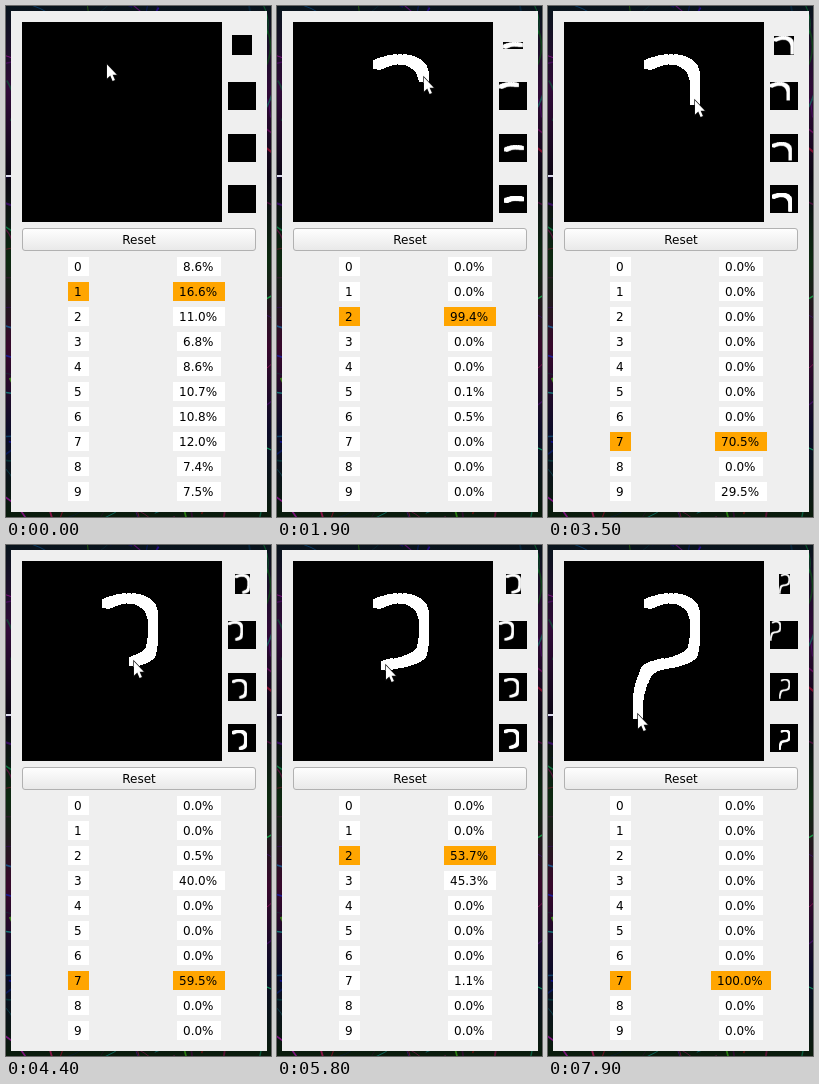
Animation, 265 px wide and 511 px high, one loop 8 s. Source, as an HTML page with a canvas:

```html
<!DOCTYPE html>
<html lang="en">
<head>
<meta charset="utf-8">
<title>Digit recognition</title>
<style>
  html, body { margin: 0; width: 100%; height: 100%; overflow: hidden; background: #000; }
  body { position: relative; font: 12px/19px "DejaVu Sans", sans-serif; color: #000; }
  canvas { position: absolute; left: 0; top: 0; }
  .cell { position: absolute; height: 19px; padding: 1px 0 0 6px; box-sizing: border-box; background: #fff; white-space: nowrap; }
  .cell.best { background: #ffa500; }
  .button {
    position: absolute; left: 16px; top: 222px; width: 234px; height: 23px; box-sizing: border-box;
    padding-top: 1px; border: 1px solid #b1b1b1; border-radius: 3px; line-height: 21px; text-align: center;
    background: linear-gradient(#fefefe, #e9e9e9);
  }
</style>
</head>
<body>
<canvas id="stage" width="265" height="511"></canvas>
<div class="button">Reset</div>
<script>
const WIDTH = 265, HEIGHT = 511, LOOP = 8000, STEP = 100, PEN_START = 300;
const ctx = document.getElementById('stage').getContext('2d');

// Strokes rest in between; each one follows a smooth curve through its points
const strokes = [
  { from: 300, to: 1000, points: [[101, 58], [117, 53], [132, 54]] },
  { from: 1100, to: 1900, points: [[143, 61], [147, 71]] },
  { from: 2300, to: 2600, points: [[147, 75]] },
  { from: 2700, to: 4400, points: [[147, 85], [144, 107], [128, 116]] },
  { from: 4700, to: 5600, points: [[112, 119]] },
  { from: 5700, to: 6500, points: [[102, 123], [97, 129]] },
  { from: 6700, to: 7200, points: [[91, 148], [90, 166]] },
  { from: 7700, to: 7900, points: [[90, 169]] }
];
const points = strokes.flatMap(stroke => stroke.points);

// Percentages by digit; digits left out are at zero
const predictions = [
  { time: 0, odds: [8.6, 16.6, 11, 6.8, 8.6, 10.7, 10.8, 12, 7.4, 7.5] },
  { time: 1200, odds: { 2: 99.4, 5: 0.1, 6: 0.5 } },
  { time: 2100, odds: { 2: 21.3, 7: 74.6, 9: 4.1 } },
  { time: 3500, odds: { 7: 70.5, 9: 29.5 } },
  { time: 4400, odds: { 2: 0.5, 3: 40, 7: 59.5 } },
  { time: 5100, odds: { 2: 53.7, 3: 45.3, 7: 1.1 } },
  { time: 6500, odds: { 2: 91.1, 3: 1.1, 7: 7.8 } },
  { time: 7400, odds: { 7: 100 } }
];

const clamp = (value, low, high) => Math.min(high, Math.max(low, value));

function makeCanvas() {
  const canvas = document.createElement('canvas');
  canvas.width = WIDTH;
  canvas.height = HEIGHT;
  return canvas;
}

// Catmull-Rom curve, one unit of u per point
function curveAt(u) {
  const i = Math.min(Math.floor(u), points.length - 2), k = u - i;
  const [a, b, c, d] = [-1, 0, 1, 2].map(n => points[clamp(i + n, 0, points.length - 1)]);
  return [0, 1].map(axis => Math.round(b[axis] + k / 2 * (c[axis] - a[axis]
    + k * (2 * a[axis] - 5 * b[axis] + 4 * c[axis] - d[axis]
    + k * (3 * (b[axis] - c[axis]) + d[axis] - a[axis])))));
}

function pointerAt(t) {
  let u = 0;
  strokes.forEach(({ from, to, points }, i) => {
    const segments = points.length - (i === 0);
    u += segments * clamp((t - from) / (to - from), 0, 1);
  });
  return curveAt(u);
}

// Every distinct place the brush has touched until t
function stampsUntil(t) {
  const stamps = [];
  if (t <= PEN_START) return stamps;
  for (let s = PEN_START; s <= t; s += 20) {
    const p = pointerAt(s), last = stamps[stamps.length - 1];
    if (!last || last[0] !== p[0] || last[1] !== p[1]) stamps.push(p);
  }
  return stamps;
}

// A block brush whose stray bristles roughen the edge
function drawInk(c, stamps) {
  c.fillStyle = '#fff';
  stamps.forEach(([x, y], i) => {
    c.fillRect(x - 5, y - 4, 10, 9);
    if (i % 5 < 2) c.fillRect(x - 1, y - 5, 3, 11);
  });
}

// The four preprocessing stages: cropped, padded, centred by mass, sharpened
function drawThumbnails(c, stamps) {
  c.fillStyle = '#000';
  for (const y of [76, 128, 179]) c.fillRect(222, y, 28, 28);
  if (!stamps.length) return c.fillRect(226, 29, 20, 20);

  const xs = stamps.map(p => p[0]), ys = stamps.map(p => p[1]);
  const mean = list => list.reduce((a, b) => a + b) / list.length;
  const left = Math.min(...xs) - 5, top = Math.min(...ys) - 5;
  const width = Math.max(...xs) + 5 - left, height = Math.max(...ys) + 6 - top;
  const scale = 20 / Math.max(width, height);
  const w = Math.round(width * scale), h = Math.round(height * scale);
  const ink = makeCanvas();
  drawInk(ink.getContext('2d'), stamps);
  c.imageSmoothingQuality = 'high';
  const place = (x, y) => c.drawImage(ink, left, top, width, height, x, y, w, h);

  const cropX = Math.round(236 - w / 2), cropY = Math.round(39 - h / 2);
  c.fillRect(cropX, cropY, w, h);
  place(cropX, cropY);
  place(222, 76);
  const dx = Math.round(15 - (mean(xs) - left) * scale);
  const dy = Math.round(14 - (mean(ys) - top) * scale);
  place(222 + dx, 128 + dy);
  for (let i = 0; i < 3; i++) place(222 + dx, 179 + dy);
}

// Dark bands of colour crossed by fine bright filaments
function drawWallpaper(c) {
  let seed = 11;
  const random = () => (seed = seed * 16807 % 2147483647) / 2147483647;
  const bands = c.createLinearGradient(0, 0, 0, HEIGHT);
  ['#08141c', '#300a38', '#0c0614', '#0c2a10', '#38082c', '#0c0c28', '#0a1c0c']
    .forEach((color, i, all) => bands.addColorStop(i / (all.length - 1), color));
  c.fillStyle = bands;
  c.fillRect(0, 0, WIDTH, HEIGHT);
  for (let i = 0; i < 260; i++) {
    const x = random() * WIDTH, y = random() * HEIGHT;
    const angle = random() * Math.PI, reach = 10 + random() * 30;
    const dx = Math.cos(angle) * reach, dy = Math.sin(angle) * reach;
    c.strokeStyle = `hsla(${100 + random() * 260}, 85%, ${15 + random() * 35}%, 0.6)`;
    c.lineWidth = 0.5 + random() * 1.5;
    c.beginPath();
    c.moveTo(x - dx, y - dy);
    c.quadraticCurveTo(x + dy / 2, y - dx / 2, x + dx, y + dy);
    c.stroke();
  }
  c.fillStyle = '#dde';
  c.fillRect(0, 169, 5, 2);
}

const cursor = new Path2D('M0 0V14L3.3 11L5.6 16.4L7.9 15.4L5.6 10.2H9.8Z');
function drawCursor([x, y]) {
  ctx.save();
  ctx.translate(x, y + 0.5);
  ctx.lineWidth = 1.4;
  ctx.strokeStyle = '#111';
  ctx.stroke(cursor);
  ctx.fillStyle = '#fff';
  ctx.fill(cursor);
  ctx.restore();
}

function addCell(left, top, width, text) {
  const cell = document.createElement('div');
  cell.className = 'cell';
  cell.style.cssText = `left:${left}px; top:${top}px; width:${width}px`;
  cell.textContent = text;
  document.body.append(cell);
  return cell;
}

const rows = Array.from({ length: 10 }, (_, i) => ({
  digit: addCell(62, 251 + 25 * i, 21, i),
  value: addCell(171, 251 + 25 * i, 44, '')
}));

function showOdds(odds) {
  const values = rows.map((_, i) => odds[i] || 0);
  const best = values.indexOf(Math.max(...values));
  rows.forEach(({ digit, value }, i) => {
    const text = values[i].toFixed(1) + '%', width = 12 + 8 * text.length;
    value.textContent = text;
    value.style.left = 193 - width / 2 + 'px';
    value.style.width = width + 'px';
    digit.classList.toggle('best', i === best);
    value.classList.toggle('best', i === best);
  });
}

// One static backdrop per prediction
for (const prediction of predictions) {
  prediction.backdrop = makeCanvas();
  const c = prediction.backdrop.getContext('2d');
  drawWallpaper(c);
  c.fillStyle = '#efefef';
  c.fillRect(5, 5, 256, 501);
  c.fillStyle = '#000';
  c.fillRect(16, 16, 200, 200);
  drawThumbnails(c, stampsUntil(prediction.time));
}

let shown = null;
function render(now) {
  const t = Math.floor(now % LOOP / STEP) * STEP;
  const current = predictions.filter(p => p.time <= t).pop();
  if (current !== shown) showOdds((shown = current).odds);
  ctx.drawImage(current.backdrop, 0, 0);
  drawInk(ctx, stampsUntil(t));
  drawCursor(pointerAt(t));
}

const start = performance.now();
function tick() {
  render(performance.now() - start);
  requestAnimationFrame(tick);
}
tick();
</script>
</body>
</html>
```
